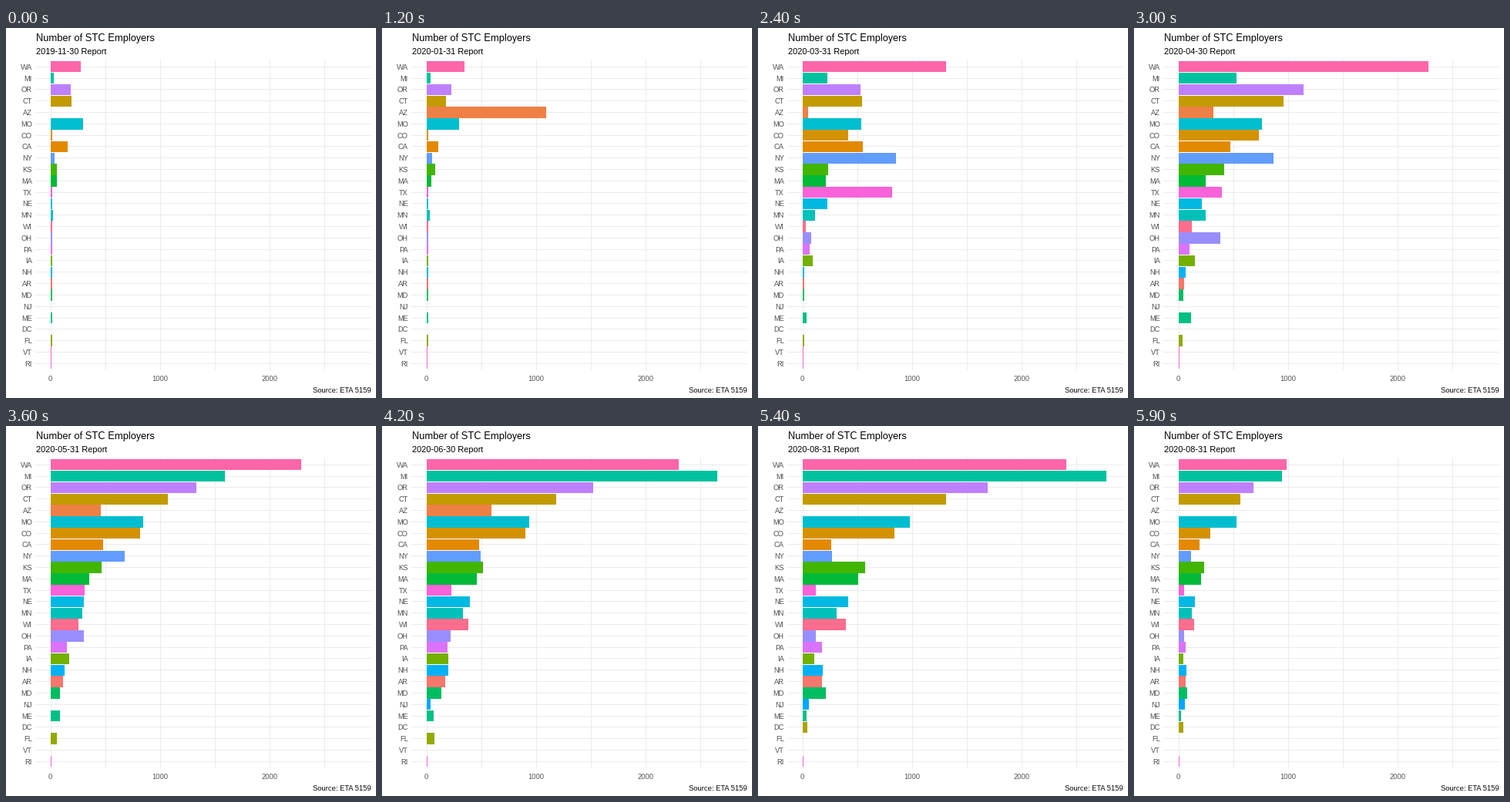
Write a matplotlib script that moves like this. It is 480 by 480 pixels and loops after 8000 ms.

```python
import math

import matplotlib.pyplot as plt
from matplotlib.animation import FuncAnimation
from matplotlib.patches import Rectangle

SIZE = 480
COUNT = 10  # monthly reports

# Each state's typical size, which all its reports are shares of
PEAK = dict(WA=2301, MI=2652, OR=1521, CT=1183, AZ=592, MO=937, CO=902,
            CA=480, NY=494, KS=515, MA=459, TX=227, NE=396, MN=332, WI=382,
            OH=220, PA=192, IA=199, NH=199, AR=171, MD=136, NJ=37, ME=65,
            DC=42, FL=72, VT=7, RI=7)

# First and last report of the states that do not file every month
FILES = dict(AZ=(1, 7), NJ=(7, 9), DC=(9, 9), FL=(0, 7), VT=(0, 5))


def report(default, groups):
    """Employers by state, from a share of the peak for each group."""
    share = {s: k for k, names in groups.items() for s in names.split()}
    return {s: max(share.get(s, default) * peak, min(14, peak))
            for s, peak in PEAK.items()}


def between(a, b):
    return {s: (a[s] + b[s]) / 2 for s in PEAK}


nov = report(0.011, {0.12: "WA OR KS MA", 0.16: "CT", 0.32: "MO CA",
                     0.08: "NY MN", 1.85: "AZ"})
jan = report(0.014, {0.15: "WA OR CT KS", 0.1: "NY MA MN", 0.22: "CA",
                     0.32: "MO", 1.85: "AZ"})
mar = report(0.085, {0.57: "WA MO NE ME", 0.46: "CT CO KS MA IA",
                     0.35: "OR MN OH PA", 1.14: "CA", 1.72: "NY",
                     3.6: "TX"})
apr = report(0.99, {0.2: "MI", 0.32: "WI NH AR MD", 0.54: "AZ MA NE PA FL",
                    0.75: "OR MN IA", 0.81: "CT MO CO KS",
                    1.75: "NY TX OH ME"})
jun = report(1, {})
aug = report(1.045, {0.55: "CA NY TX OH IA ME", 0.93: "CO PA NH MN",
                     1.11: "OR CT KS MA", 1.57: "MD NJ"})
REPORTS = [nov, between(nov, jan), jan, jan, mar, apr, between(apr, jun),
           jun, between(jun, aug), aug]

# Layout in pixels
LEFT, RIGHT, TOP, BOTTOM = 38, 474, 41, 444
ZERO, PER_UNIT = 57.7, 0.1422
FIRST, STEP, BAR = 43.147, 14.805, 13.33
SMALL = 9.4
GRID = "#EBEBEB"
GREY = "#4D4D4D"


def hcl(hue, chroma=100, lum=65):
    """Polar LUV to sRGB, clipped to the gamut."""
    angle = math.radians(hue)
    y = ((lum + 16) / 116) ** 3
    u = chroma * math.cos(angle) / (13 * lum) + 0.1978398
    v = chroma * math.sin(angle) / (13 * lum) + 0.4683363
    x = 9 * y * u / (4 * v)
    z = -x / 3 - 5 * y + 3 * y / v
    linear = (3.240479 * x - 1.537150 * y - 0.498535 * z,
              -0.969256 * x + 1.875992 * y + 0.041556 * z,
              0.055648 * x - 0.204043 * y + 1.057311 * z)

    def gamma(c):
        c = 1.055 * c ** (1 / 2.4) - 0.055 if c > 0.00304 else 12.92 * c
        return min(max(c, 0), 1)

    return tuple(gamma(c) for c in linear)


def px(value):
    return math.floor(ZERO + PER_UNIT * value + 0.5)


def date(i):
    """Last day of the i-th month, counted from November 2019."""
    years, month = divmod(10 + i, 12)
    month += 1
    day = 29 if month == 2 else 30 if month in (4, 6, 9, 11) else 31
    return f"{2019 + years}-{month:02d}-{day}"


plt.rcParams["font.family"] = "Liberation Sans"
plt.rcParams["text.hinting"] = "native"
fig = plt.figure(figsize=(SIZE / 72, SIZE / 72), dpi=72, facecolor="white")
ax = fig.add_axes([0, 0, 1, 1])
ax.set_xlim(0, SIZE)
ax.set_ylim(SIZE, 0)
ax.axis("off")


def box(x, y, w, h, color, z):
    return ax.add_patch(Rectangle((x, y), w, h, facecolor=color, linewidth=0,
                                  antialiased=False, zorder=z))


def label(x, y, text, size, color="black", ha="left"):
    return ax.text(x, y, text, fontsize=size, color=color, ha=ha,
                   va="baseline")


for value in range(0, 3000, 500):
    box(px(value), TOP, 1, BOTTOM - TOP, GRID, 1)
for value in range(0, 3000, 1000):
    label(ZERO + PER_UNIT * value, 458, str(value), SMALL, GREY, "center")

by_name = sorted(PEAK)
bars = {}
for i, state in enumerate(PEAK):
    top = FIRST + STEP * i
    middle = round(top + BAR / 2)
    box(LEFT, middle, RIGHT - LEFT, 1, GRID, 1)
    label(34, middle + 4, state, SMALL, GREY, "right")
    y0, y1 = round(top), round(top + BAR) + 1
    color = hcl(15 + 360 * by_name.index(state) / len(PEAK))
    bars[state] = box(px(0), y0, 0, y1 - y0, color, 2)

label(39, 17, "Number of STC Employers", 12.9)
subtitle = label(39, 34, "", 11)
label(RIGHT, 473, "Source: ETA 5159", SMALL, ha="right")


def files(state, i):
    first, last = FILES.get(state, (0, COUNT - 1))
    return first <= i <= last


def moment(frame):
    """Report index and progress towards the next one."""
    frame = min(frame, 59)
    if frame < 6:
        return 0, max(frame - 2, 0) / 4
    cycle, step = divmod(frame - 6, 6)
    return cycle + 1, max(step - 3, 0) / 3


def draw(frame):
    i, t = moment(frame)
    j = (i + 1) % COUNT
    subtitle.set_text(f"{date(j if t > 0.7 else i)} Report")
    for state, bar in bars.items():
        value = REPORTS[i][state]
        if files(state, j):
            value += (REPORTS[j][state] - value) * t
        bar.set_width(px(value) - px(0))
        bar.set_visible(files(state, i))
    return [subtitle, *bars.values()]


anim = FuncAnimation(fig, draw, frames=80, interval=100, repeat=True,
                     repeat_delay=0, blit=False)
plt.show()
```
